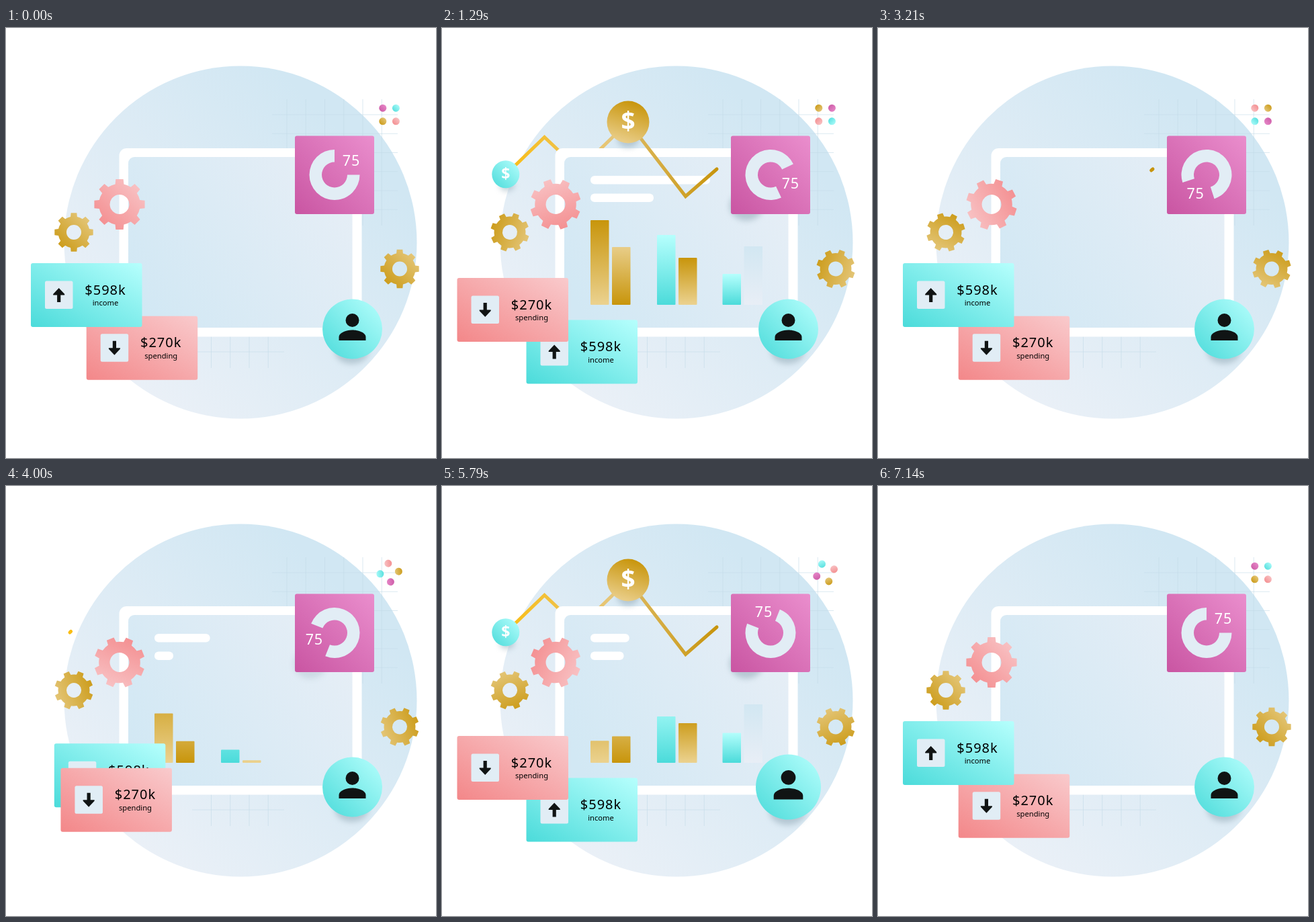
These frames come from a looping animation (640 px wide and 640 px high, 7.21 s). An HTML page:

```html
<!DOCTYPE html>
<html lang="en">
<head>
<meta charset="utf-8">
<title>Finance dashboard</title>
<style>
  html, body { margin: 0; width: 100%; height: 100%; overflow: hidden; background: #fff; }
  svg { display: block; width: 100%; height: 100%; }
  text { font-family: "Noto Sans", "Open Sans", sans-serif; text-anchor: middle; }
  .amount { font-size: 20px; letter-spacing: 1px; }
  .label { font-size: 11.2px; }
  .coin { font-weight: 700; fill: #fff; }
  .shadow { fill: #93a9b6; opacity: .55; filter: blur(4px); }
  .grid { stroke: #c3dae8; stroke-width: .8; fill: none; opacity: .75; }
  .trail { fill: none; stroke-width: 5; stroke-linecap: round; }
</style>
</head>
<body>
<svg viewBox="0 0 640 640">
  <defs id="defs">
    <linearGradient id="trailBack" gradientUnits="userSpaceOnUse" x1="95" x2="255"><stop stop-color="#fabd12"/><stop offset="1" stop-color="#e5c67c"/></linearGradient>
    <linearGradient id="trailFront" gradientUnits="userSpaceOnUse" x1="285" x2="409"><stop stop-color="#dcb75a"/><stop offset="1" stop-color="#c7940c"/></linearGradient>
  </defs>
  <circle cx="349" cy="319" r="262.5" fill="url(#sky)"/>
  <path id="grid" class="grid"/>
  <path id="back" class="trail" pathLength="1" stroke="url(#trailBack)" d="M95 218L152.500 162.500L204 211L277 140"/>
  <rect x="168.500" y="179" width="361" height="280.500" rx="11" fill="#fff"/>
  <rect x="182" y="192" width="333.500" height="254" rx="9" fill="url(#screen)"/>
  <rect id="line1" x="221" y="220" height="12.500" rx="6" fill="#fff"/>
  <rect id="line2" x="221" y="246.500" height="12.500" rx="6" fill="#fff"/>
  <g id="bars"></g>
  <g id="gears"></g>
  <path id="front" class="trail" pathLength="1" stroke="url(#trailFront)" d="M277 140L362.500 250.500L409 210"/>
  <g id="goldCoin">
    <ellipse class="shadow" cy="25" rx="16" ry="13"/>
    <circle r="31.500" fill="url(#goldDown)"/>
    <text class="coin" y="12" font-size="37">$</text>
  </g>
  <g id="cyanCoin">
    <ellipse class="shadow" cx="2" cy="17" rx="11" ry="8"/>
    <circle r="20.500" fill="url(#cyan)"/>
    <text class="coin" y="7.500" font-size="23">$</text>
  </g>
  <g id="tileShadow"><ellipse class="shadow" cx="453" cy="265" rx="25" ry="22"/></g>
  <rect x="430" y="160.500" width="118" height="116.500" rx="3" fill="url(#magenta)"/>
  <path id="donut" fill="#e2edf5" d="M37.500 0A37.500 37.500 0 1 1 0-37.500V-19A19 19 0 1 0 19 0Z"/>
  <text id="score" font-size="21.500" letter-spacing=".8" fill="#fff">75</text>
  <g id="dots">
    <circle cx="-9.800" cy="-9.800" r="5.500" fill="url(#magenta)"/>
    <circle cx="9.800" cy="-9.800" r="5.500" fill="url(#cyan)"/>
    <circle cx="-9.800" cy="9.800" r="5.500" fill="url(#gold)"/>
    <circle cx="9.800" cy="9.800" r="5.500" fill="url(#pink)"/>
  </g>
  <g id="cards"></g>
  <g id="avatar">
    <ellipse class="shadow" cx="-1" cy="33" rx="25" ry="19"/>
    <circle r="44.500" fill="url(#cyan)"/>
    <circle cy="-13" r="10" fill="#101414"/>
    <path d="M-20 17V12C-20 5-8 1.500 0 1.500S20 5 20 12V17Z" fill="#101414"/>
  </g>
</svg>
<script>
const $ = id => document.getElementById(id);
const svg = (parent, markup) => {
  parent.insertAdjacentHTML('beforeend', markup);
  return parent.lastElementChild;
};

// Diagonal gradients run from bottom left to top right.
const gradient = (id, from, to, coords) => svg($('defs'),
  `<linearGradient id="${id}" ${coords || 'x1="0" y1="1" x2="1" y2="0"'}>
     <stop stop-color="${from}"/><stop offset="1" stop-color="${to}"/></linearGradient>`);
gradient('sky', '#eaf0f7', '#d1e7f3', 'x1=".15" y1=".85" x2=".8" y2=".2"');
gradient('screen', '#d2e8f4', '#e6eef6', 'x1="0" y1=".75" x2="1" y2=".25"');
gradient('cyan', '#4bdbda', '#b6fffd');
gradient('pink', '#f38789', '#f9cacc');
gradient('gold', '#c8950b', '#e8cd88');
gradient('goldDown', '#ebd08e', '#c8950b', 'x1=".3" y1="1" x2=".6" y2="0"');
gradient('magenta', '#c955a2', '#ea8ecd');

let gridPath = '';
for (let i = 0; i < 6; i++) {
  const step = i * 28.25;
  gridPath += `M${418 + step} 106V294M396 ${129 + step}H583`;
}
for (let i = 0; i < 4; i++) gridPath += `M${305.5 + i * 28.25} 455V506`;
$('grid').setAttribute('d', gridPath + 'M277 482H414');

const BASE = 412;
const bars = [
  [221, 126, '#c8950b', '#ebd290'],
  [253, 86, '#e8cd88', '#c8950b'],
  [320, 104, '#b6fffd', '#4bdbda'],
  [352, 70, '#c8950b', '#ebd290'],
  [417.5, 46, '#b6fffd', '#4bdbda'],
  [449.5, 87, '#d2e7f2', '#e8eef6']
].map(([x, height, top, bottom], i) => {
  gradient('bar' + i, top, bottom,
    `gradientUnits="userSpaceOnUse" x1="0" x2="0" y1="${BASE - height}" y2="${BASE}"`);
  return { height, el: svg($('bars'), `<rect x="${x}" width="27.500" rx="1" fill="url(#bar${i})"/>`) };
});

function gearPath(r) {
  const at = (angle, k) => `${r * k * Math.sin(angle)} ${-r * k * Math.cos(angle)}`;
  const body = .81, hole = .38 * r;
  let d = '';
  for (let i = 0; i < 8; i++) {
    const a = i * Math.PI / 4;
    d += (i ? `A${r * body} ${r * body} 0 0 1 ` : 'M') + at(a - .21, body) +
      `L${at(a - .15, 1)}L${at(a + .15, 1)}L${at(a + .21, body)}`;
  }
  return d + `A${r * body} ${r * body} 0 0 1 ${at(-.21, body)}Z` +
    `M${hole} 0A${hole} ${hole} 0 1 0 ${-hole} 0A${hole} ${hole} 0 1 0 ${hole} 0Z`;
}
const gears = [
  [169, 262.5, 38, 'pink', -1],
  [101, 304, 29, 'gold', 1],
  [586, 358.5, 29, 'gold', 1]
].map(([x, y, r, fill, dir]) => ({
  x, y, dir,
  el: svg($('gears'), `<path d="${gearPath(r)}" fill="url(#${fill})" fill-rule="evenodd"/>`)
}));

const card = (fill, amount, label, turn, home, away) => ({
  home, away,
  el: svg($('cards'), `<g>
    <rect width="165.500" height="95" rx="3" fill="url(#${fill})"/>
    <rect x="21" y="26.500" width="41.500" height="41.500" rx="2.500" fill="#e1edf5"/>
    <path d="M0-10.500L8.500-1.500V0H2.600V10.500H-2.600V0H-8.500V-1.500Z" fill="#101414"
      transform="translate(41.700 47.500) rotate(${turn})"/>
    <text class="amount" x="111" y="46.700">${amount}</text>
    <text class="label" x="111" y="63">${label}</text></g>`)
});
const spending = card('pink', '$270k', 'spending', 180, [119.7, 428.7], [22.5, 372]);
const income = card('cyan', '$598k', 'income', 0, [37, 350], [125.5, 434.5]);

const smooth = (f, start, length) => {
  const x = Math.min(1, Math.max(0, (f - start) / length));
  return x * x * (3 - 2 * x);
};
const inOut = (f, open, close, length = 7.2) => smooth(f, open, length) - smooth(f, close, length);
const pose = (el, x, y, rest = '') => el.setAttribute('transform', `translate(${x} ${y}) ${rest}`);

function trim(el, from, to) {
  const a = Math.max(0, from), b = Math.min(1, to);
  el.style.display = b > a ? '' : 'none';
  el.setAttribute('stroke-dasharray', `${b - a} 2`);
  el.setAttribute('stroke-dashoffset', -a);
}

function setWidth(el, width) {
  el.setAttribute('width', Math.max(0, width));
}

// The lower card dips out first, then both trade places.
function shuffle(f) {
  const returning = f > 26;
  const dip = returning ? 28 * smooth(f, 33, 3) : 22 * smooth(f, 0, 3);
  const move = returning ? smooth(f, 36, 8) : smooth(f, 3, 7);
  const lower = returning ? income : spending;
  for (const c of [spending, income]) {
    const [from, to] = returning ? [c.away, c.home] : [c.home, c.away];
    const y = from[1] + (c === lower ? dip : 0);
    pose(c.el, from[0] + (to[0] - from[0]) * move, y + (to[1] - y) * move);
  }
  const top = f >= 4 && f < 37 ? spending : income;
  if ($('cards').lastElementChild !== top.el) $('cards').append(top.el);
}

const LOOP = 7210, TICK = 71.4, HALF = 50, SPLIT = .56;

function draw() {
  const n = Math.floor((performance.now() % LOOP + 5) / TICK) % (2 * HALF);
  const f = n % HALF, turn = n * 3.6;

  for (const g of gears) pose(g.el, g.x, g.y, `rotate(${g.dir * turn})`);
  pose($('donut'), 489, 218.5, `rotate(${turn})`);
  const a = (turn + 49.5) * Math.PI / 180;
  pose($('score'), 489.4 + 32.3 * Math.sin(a), 226 - 32.3 * Math.cos(a));

  const quarters = 2 * Math.floor(n / HALF) + smooth(f, 2, 9) + smooth(f, 28, 9);
  pose($('dots'), 570.6, 129, `rotate(${90 * quarters})`);

  bars.forEach(({ el, height }, i) => {
    const h = height * inOut(f, 2 + i, 26.2 + i);
    el.setAttribute('y', BASE - h);
    el.setAttribute('height', h);
  });
  setWidth($('line1'), 178 * inOut(f, 1, 24.5, 10.5));
  setWidth($('line2'), 94 * inOut(f, 3, 27, 8.3));

  const from = smooth(f, 33, 12.6), to = smooth(f, 5.5, 12);
  trim($('back'), from / SPLIT, to / SPLIT);
  trim($('front'), (from - SPLIT) / (1 - SPLIT), (to - SPLIT) / (1 - SPLIT));
  pose($('cyanCoin'), 94.8, 217.7, `scale(${inOut(f, 6, 31.8)})`);
  pose($('goldCoin'), 277, 140, `scale(${inOut(f, 10.5, 36.5)})`);
  $('tileShadow').setAttribute('opacity', inOut(f, 2, 35, 8));

  const beat = f > 24 && f < 39 ? Math.sin(Math.PI * (f - 24) / 15) : 0;
  pose($('avatar'), 515.5, 448, `scale(${1 + .09 * beat})`);

  shuffle(f);
  requestAnimationFrame(draw);
}
draw();
</script>
</body>
</html>
```
